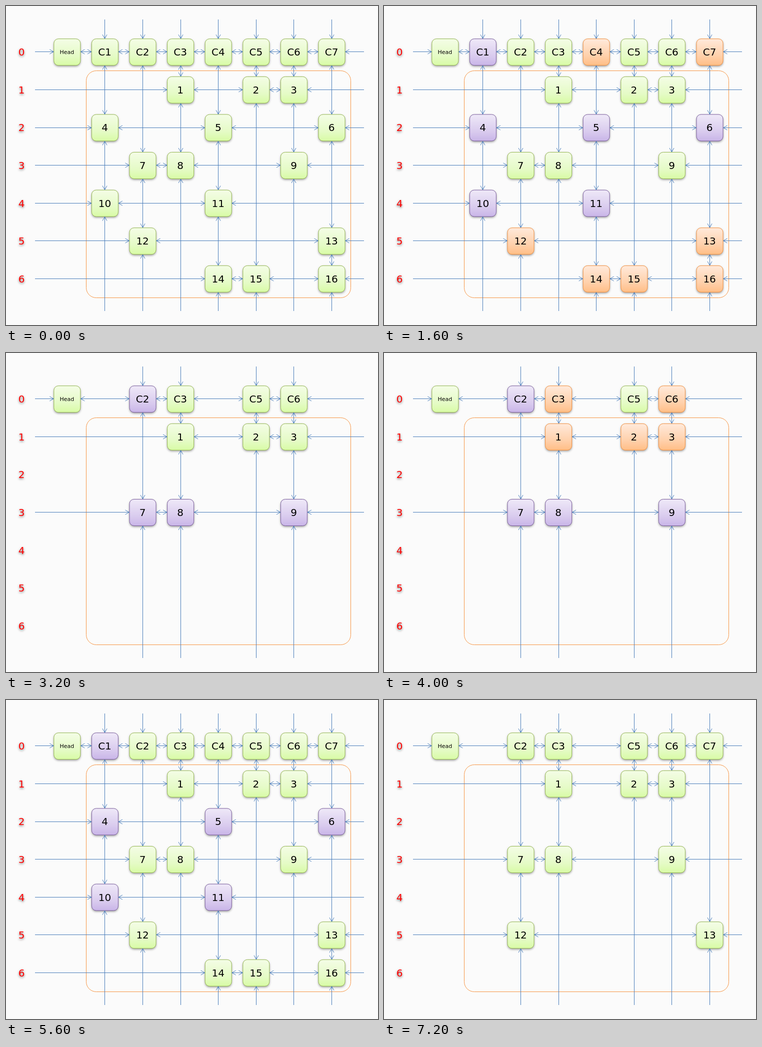
An HTML page with a canvas for the animation above (8000 ms loop, 744 px wide and 638 px high).

```html
<!DOCTYPE html>
<html lang="en">
<head>
<meta charset="utf-8">
<title>Linked grid elimination</title>
<style>
  html, body { margin: 0; width: 744px; height: 638px; overflow: hidden; background: #fbfbfb; }
  canvas { display: block; }
</style>
</head>
<body>
<canvas id="stage" width="744" height="638"></canvas>
<script>
const ctx = document.getElementById('stage').getContext('2d');
const STEP = 800, PITCH = 75.6, HALF = 26.5, LINE = '#4a7ebb';
const FONT = '"DejaVu Sans", sans-serif';

// Columns holding a numbered node, listed row by row.
const rows = [[3, 5, 6], [1, 4, 7], [2, 3, 6], [1, 4], [2, 7], [4, 5, 7]];
const nodes = [{ name: 'Head', col: 0, row: 0 }];
for (let col = 1; col <= 7; col++) nodes.push({ name: 'C' + col, col, row: 0 });
let count = 0;
rows.forEach((cols, i) => {
  for (const col of cols) nodes.push({ name: String(++count), col, row: i + 1 });
});

const styles = {
  green:  { fill: ['#f4fde6', '#e5fbc6', '#d8fba5'], edge: '#98b954' },
  purple: { fill: ['#efe9f8', '#d9cbee', '#c9b5e8'], edge: '#7d60a0' },
  orange: { fill: ['#ffeadb', '#ffd0aa', '#ffbe86'], edge: '#f69240' }
};

const list = text => text.split(' ');
const rowTwo = list('C1 4 5 6 10 11');
const rowThree = list('C2 7 8 9');
const coverOne = list('C4 C7 12 13 14 15 16');
const coverTwo = list('C3 C6 1 2 3');
const coverThree = list('C4 14 15 16');
const firstCut = [...rowTwo, ...coverOne];
const secondCut = [...firstCut, ...rowThree, ...coverTwo];

const scene = (gone = [], purple = [], orange = []) => ({ gone, purple, orange });
const scenes = [
  scene(),
  scene([], rowTwo),
  scene([], rowTwo, coverOne),
  scene(firstCut),
  scene(firstCut, rowThree),
  scene(firstCut, rowThree, coverTwo),
  scene(secondCut),
  scene([], rowTwo),
  scene([], rowTwo, coverThree),
  scene([...rowTwo, ...coverThree])
];

const nodeX = col => 122.3 + PITCH * col;
const nodeY = row => 92.2 + PITCH * row;
const lineX = col => Math.round(121.8 + PITCH * col) + 0.5;
const lineY = row => Math.round(91.3 + PITCH * row) + 0.5;

function shadow(on, alpha = 0.42) {
  ctx.shadowColor = on ? `rgba(0,0,0,${alpha})` : 'transparent';
  ctx.shadowBlur = on ? 4 : 0;
  ctx.shadowOffsetY = on ? 2 : 0;
}

function roundBox(x, y, w, h, r) {
  ctx.beginPath();
  ctx.roundRect(x, y, w, h, r);
}

function drawNode({ name, col, row }, style) {
  const x = nodeX(col), y = nodeY(row);
  const fill = ctx.createLinearGradient(0, y - HALF, 0, y + HALF);
  style.fill.forEach((color, i) => fill.addColorStop([0, 0.65, 1][i], color));
  roundBox(x - HALF, y - HALF, 2 * HALF, 2 * HALF, 9);
  ctx.fillStyle = fill;
  shadow(true);
  ctx.fill();
  shadow(false);
  ctx.strokeStyle = style.edge;
  ctx.stroke();
  const head = name === 'Head';
  ctx.font = `${head ? 11 : 20}px ${FONT}`;
  ctx.fillStyle = '#000';
  ctx.fillText(name, x - 0.4, Math.round(y + (head ? 4 : 7)));
}

// Draws along one axis; `at` is the fixed coordinate on the other.
function link(from, to, at, vertical, startHead, endHead) {
  const point = (method, along, across) =>
    vertical ? ctx[method](across, along) : ctx[method](along, across);
  const head = (tip, dir) => {
    point('moveTo', tip - 8 * dir, at - 4.5);
    point('lineTo', tip, at);
    point('lineTo', tip - 8 * dir, at + 4.5);
  };
  ctx.beginPath();
  point('moveTo', from, at);
  point('lineTo', to, at);
  if (startHead) head(from, -1);
  if (endHead) head(to, 1);
  ctx.stroke();
}

function chain(centers, start, end, at, vertical) {
  if (!centers.length) return;
  const gap = HALF + 0.5;
  let from = start;
  centers.forEach((center, i) => {
    link(from, center - gap, at, vertical, i > 0, true);
    from = center + gap;
  });
  link(from, end, at, vertical, true, false);
}

function drawLabels() {
  ctx.font = `20px ${FONT}`;
  ctx.fillStyle = '#f00';
  shadow(true, 0.55);
  for (let row = 0; row <= 6; row++) ctx.fillText(row, 31, Math.round(nodeY(row) + 7));
  shadow(false);
}

function draw({ gone, purple, orange }) {
  ctx.fillStyle = '#fbfbfb';
  ctx.fillRect(0, 0, 744, 638);
  ctx.lineWidth = 1;
  ctx.textAlign = 'center';
  drawLabels();

  roundBox(160.5, 129.5, 529, 454, 20);
  ctx.strokeStyle = '#f79646';
  ctx.stroke();

  const live = nodes.filter(node => !gone.includes(node.name));
  for (const node of live) {
    const tone = purple.includes(node.name) ? 'purple'
      : orange.includes(node.name) ? 'orange' : 'green';
    drawNode(node, styles[tone]);
  }

  ctx.strokeStyle = LINE;
  for (let i = 0; i <= 7; i++) {
    const across = live.filter(node => node.row === i).map(node => nodeX(node.col));
    chain(across, 58, 716, lineY(i), false);
    if (i === 0) continue;
    const down = live.filter(node => node.col === i).map(node => nodeY(node.row));
    chain(down, 27, 610, lineX(i), true);
  }
}

const began = performance.now();
function tick() {
  const elapsed = Math.max(0, performance.now() - began);
  draw(scenes[Math.floor(elapsed / STEP) % scenes.length]);
  requestAnimationFrame(tick);
}
tick();
</script>
</body>
</html>
```
